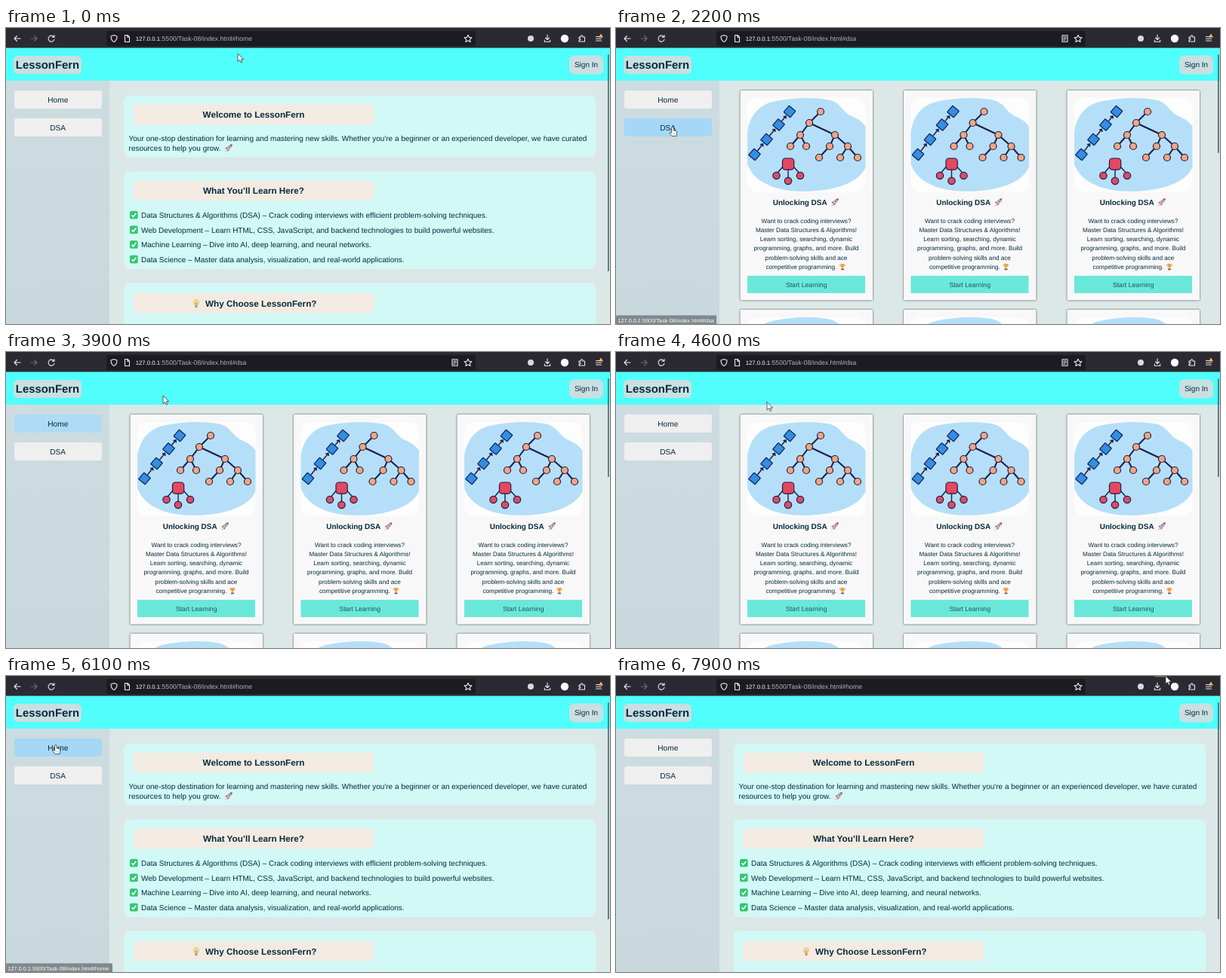
An HTML page that plays this animation: 800x393 px, repeating every 8 s.

```html
<!DOCTYPE html>
<html lang="en">
<head>
<meta charset="utf-8">
<title>Learning site</title>
<style>
  html, body { margin: 0; width: 100%; height: 100%; overflow: hidden; background: #dbe8e7; }
  svg { display: block; width: 100vw; height: 100vh; }
  text {
    font-family: "Liberation Sans", Arial, sans-serif;
    text-rendering: geometricPrecision;
    fill: #062a3d;
    white-space: pre;
  }
  .mid { text-anchor: middle; }
  .bold { font-weight: bold; }
  .icon { fill: none; stroke: #e9e9ee; stroke-width: 1.1; stroke-linecap: round; stroke-linejoin: round; }
  .card { filter: drop-shadow(0 0 1.3px rgba(0, 0, 0, .75)); }
</style>
</head>
<body>
<svg id="stage" viewBox="0 0 800 393" xmlns="http://www.w3.org/2000/svg"></svg>
<script>
const LOOP = 8000, STEP = 100;
const SITE = "LessonFern";
const NAVY = "#1b1d4b";
const PATH = ":5500/Task-08/index.html#";

const rect = (x, y, w, h, fill, r = 0, more = "") =>
  `<rect x="${x}" y="${y}" width="${w}" height="${h}" rx="${r}" fill="${fill}" ${more}/>`;
const text = (s, x, y, size = 10, cls = "", fill = "") =>
  `<text x="${x}" y="${y}" font-size="${size}" class="${cls}"${fill && ` style="fill:${fill}"`}>${s}</text>`;
const dot = (x, y, r, fill, more = "") => `<circle cx="${x}" cy="${y}" r="${r}" fill="${fill}" ${more}/>`;
const path = (d, more = "") => `<path d="${d}" ${more}/>`;
const icon = (d, more = "") => path(d, `class="icon" ${more}`);
const at = (x, y, body) => `<g transform="translate(${x} ${y})">${body}</g>`;

// Small pictograms, about 11 px square
const rocket = (x, y) => at(x, y,
  path("M1 6L4 4L7 7L5 10L4.300 7.800L3.200 6.700Z", 'fill="#e2364f"') +
  path("M3 8L.5 10.500L3 9.800L4 8.500Z", 'fill="#f7a63b"') +
  path("M3 6.500C4.500 3 7 .8 10.500 .5C10.400 4 8 6.600 4.500 8Z", 'fill="#c3bccb" stroke="#8f8699" stroke-width=".5"') +
  path("M7.500 1.100Q9.300 .4 10.500 .5Q10.500 2 9.900 3.500Z", 'fill="#dd2f4c"') +
  dot(6.9, 4.1, 1.1, "#4a91c9"));
const check = y => at(164, y,
  rect(0, 0, 10.6, 10.6, "#32c671", 2) +
  path("M2.500 5.500L4.500 7.700L8.300 2.900", 'fill="none" stroke="#fff" stroke-width="1.600"'));
const bulb = (x, y) => at(x, y,
  path("M3 7C1 5 1.200 1 5 .8C8.800 1 9 5 7 7L6.500 8.500H3.500Z", 'fill="#f8dc9a" stroke="#d4aa63" stroke-width=".7"') +
  path("M3.800 4L5 7.800L6.200 4", 'fill="none" stroke="#d88a3c" stroke-width=".8"') +
  rect(3.5, 8.5, 3, 2.8, "#8e9a93", 1));
const trophy = (x, y) => at(x, y,
  path("M1.500 1.500H.3Q.3 4.300 2.500 4.500M6.500 1.500H7.700Q7.700 4.300 5.500 4.500", 'fill="none" stroke="#e9ab63" stroke-width=".7"') +
  path("M1.500 .5H6.500Q6.500 5 4.600 5.600V7H3.400V5.600Q1.500 5 1.500 .5Z", 'fill="#f0a03e"') +
  rect(2, 7, 4, 1.8, "#8a4a32", .3));

function browserBar() {
  return rect(0, 0, 800, 26.4, "#2b2a33") + rect(133, 4, 489, 20, "#1c1b22", 3) +
    icon("M19 14H11M14.500 10.500L11 14L14.500 17.500") +
    icon("M33 14H41M37.500 10.500L41 14L37.500 17.500", 'opacity=".35"') +
    icon("M63.500 12A4 4 0 1 0 64 15M64 9.500V12.300H61") +
    icon("M143 9.500L147 11C147 15 145.500 17.300 143 18.500C140.500 17.300 139 15 139 11Z") +
    icon("M158 9.500H161L163.500 12V18.500H157.500V9.500ZM160.800 9.700V12.200H163.300") +
    icon("M612 9.200L613.500 12.400L617 12.800L614.400 15.100L615.100 18.500L612 16.800L608.900 18.500L609.600 15.100L607 12.800L610.500 12.400Z") +
    dot(695, 14, 4, "#d9d9de") +
    icon("M717 9V15.500M714.500 13L717 15.500L719.500 13M713.300 16V18.200H720.700V16") +
    dot(740, 14, 5.2, "#fbfbfb") +
    icon("M759 12H761.500C760.500 9 764.800 9 763.800 12H766.500V18H759V16C761.500 16.800 761.500 13.200 759 14Z") +
    icon("M781.500 11.500H788.500M781.500 14.200H788.500M781.500 17H788.500") +
    path("M788 7.500L791 12.500H785Z", 'fill="#ffbd4f"') +
    text("127.0.0.1", 171.700, 17.200, 7.8, "", "#fbfbfe") +
    `<text id="url" x="204.200" y="17.200" font-size="8.600" style="fill:#b3b2bd"></text>` +
    `<g id="reader">${icon("M591 9.800H598V18.200H591ZM592.800 12H596.200M592.800 14H596.200M592.800 16H595")}</g>`;
}

function frame() {
  return rect(0, 26, 800, 44, "#50fffb") +
    rect(10, 37, 90, 24, "#c9dfe1", 6) + text(SITE, 55, 54.200, 14.9, "mid bold") +
    rect(746, 36.500, 45, 25, "#c9dfe1", 7) + text("Sign In", 768.500, 52.400, 10, "mid") +
    rect(0, 70, 137, 323, "url(#side)") +
    rect(11, 83, 116, 24, "#efefef", 3, 'id="home"') + text("Home", 68.800, 99, 10.2, "mid") +
    rect(11, 120, 116, 24, "#efefef", 3, 'id="dsa"') + text("DSA", 68.700, 135.700, 10.2, "mid");
}

function homePage() {
  const panel = (y, h) => rect(156, y, 625.500, h, "#d2f9f6", 8);
  const bar = y => rect(168.500, y, 318.500, 26.500, "#f3ebe1", 4);
  const topics = [
    "Data Structures &amp; Algorithms (DSA) – Crack coding interviews with efficient problem-solving techniques.",
    "Web Development – Learn HTML, CSS, JavaScript, and backend technologies to build powerful websites.",
    "Machine Learning – Dive into AI, deep learning, and neural networks.",
    "Data Science – Master data analysis, visualization, and real-world applications."
  ];
  return panel(89.500, 82) + bar(101.800) + text("Welcome to " + SITE, 328, 119, 11.7, "mid bold") +
    text("Your one-stop destination for learning and mastering new skills. Whether you're a beginner or an experienced developer, we have curated", 162.600, 149.600, 9.98) +
    text("resources to help you grow.", 162.600, 162.800, 9.98) + rocket(289, 154) +
    panel(190.500, 129.500) + bar(202.800) + text("What You’ll Learn Here?", 328, 220, 11.7, "mid bold") +
    topics.map((s, i) => check(243 + 19.6 * i) + text(s, 179, 252 + 19.6 * i, 9.98)).join("") +
    panel(338.500, 80) + bar(352) + bulb(247, 360) + text(`Why Choose ${SITE}?`, 264, 369.700, 11.7, "bold");
}

function picture() {
  const nodes = [[271, 111], [256, 126], [244, 142], [231, 157], [252, 157], [290, 142],
    [283, 157], [307, 157], [269, 172], [297, 172], [320, 172]];
  const parent = [0, 0, 1, 2, 2, 1, 5, 5, 6, 7, 7];
  const boxes = [[183.500, 168], [199.500, 148], [215.500, 128.500], [230, 111]];
  const leaves = [[212.500, 196], [228, 203], [244, 196]];
  const line = `stroke="${NAVY}" stroke-width="2" fill="none"`;
  const edge = `stroke="${NAVY}" stroke-width="1.200"`;
  return rect(174, 93, 156.500, 125, "#fdfdfd", 13) +
    path("M174 138C177 118 188 101 212 97C236 92 262 92 280 95C298 98 299 111 312 117C321 121 327 125 330.500 131V185C322 204 296 213 268 216C240 219 216 215 203 209C189 203 179 194 174 181Z", 'fill="#b5dff8"') +
    boxes.slice(1).map(([x, y], i) => {
      const [a, b] = boxes[i];
      return path(`M${a + 4} ${b - 5}L${x - 5} ${y + 6}m-3.500 .7l3.500 -.7l.3 3.500`, `stroke="${NAVY}" stroke-width="1.500" fill="none"`);
    }).join("") +
    boxes.map(([x, y]) => rect(-5.600, -5.600, 11.2, 11.2, "#318fe6", .6, `${edge} transform="translate(${x} ${y}) rotate(40)"`)).join("") +
    nodes.map((p, i) => path(`M${nodes[parent[i]]}L${p}`, line)).join("") +
    nodes.map(([x, y]) => dot(x, y, 4.5, "#f3a582", edge)).join("") +
    path("M228 188V200M221 184L212.500 194M235 184L244 194", `stroke="${NAVY}" stroke-width="1.400" fill="none"`) +
    rect(220.500, 173, 15.2, 15.2, "#e5475f", 4, edge) +
    leaves.map(([x, y]) => dot(x, y, 4.7, "#dc4c66", edge)).join("");
}

function course(x, y) {
  const lines = ["Want to crack coding interviews?", "Master Data Structures &amp; Algorithms!",
    "Learn sorting, searching, dynamic", "programming, graphs, and more. Build",
    "problem-solving skills and ace"];
  return at(x, y,
    rect(164.500, 83, 175.500, 278.5, "#f8f8f8", 1, 'class="card"') + picture() +
    text("Unlocking DSA", 243.700, 235, 9.95, "mid bold") + rocket(284, 226) +
    lines.map((s, i) => text(s, 252, 258.700 + 12.2 * i, 8.17, "mid")).join("") +
    text("competitive programming.", 198.500, 319.700, 8.17) + trophy(296, 312.500) +
    rect(174, 329, 156, 23, "#69e8da") +
    text("Start Learning", 252.200, 344, 8.7, "mid", "#245058"));
}

function dsaPage() {
  let out = "";
  for (const y of [0, 291]) for (const x of [0, 216.5, 433]) out += course(x, y);
  return out;
}

const arrow = path("M0 0V10.500L2.500 8.300L4.100 12L5.900 11.200L4.300 7.700H7.600Z", 'fill="#fff" stroke="#30343c" stroke-width=".8"');
const hand = path("M-1.300 1.200Q0 -.8 1.200 1.200V5L5 5.800Q6 6.200 5.800 8L5 12.500H-1L-4 8.600Q-4 6.800 -2.500 7.500L-1.300 8.500Z", 'fill="#fff" stroke="#30343c" stroke-width=".8"') +
  path("M2.900 8.500V10.500M.8 8.500V10.500", 'stroke="#555" stroke-width=".5"');

document.getElementById("stage").innerHTML =
  `<defs><linearGradient id="side" x2="0" y2="1"><stop stop-color="#cddce0"/><stop offset="1" stop-color="#c9d8dd"/></linearGradient></defs>` +
  rect(0, 0, 800, 393, "#dbe8e7") +
  `<g id="homePage">${homePage()}</g><g id="dsaPage">${dsaPage()}</g>` +
  frame() + browserBar() + rect(797, 35, 1.7, 288, "#4f6b70", .8, 'id="thumb"') +
  `<g id="status">${rect(0, 381.500, 141, 12, "#7f888c", 1, 'id="tip"')}<text id="link" x="2.500" y="390.500" font-size="7.300" style="fill:#fff"></text></g>` +
  rect(713, 0, 17, 1.3, "#73737b", 0, 'id="tab"') +
  `<g id="arrow">${arrow}</g><g id="hand">${hand}</g>`;

const $ = id => document.getElementById(id);
const show = (id, on) => $(id).style.display = on ? "" : "none";

// Rows: time, values...
const MOVES = [[0, 307, 34], [300, 290, 46], [700, 180, 92], [1000, 84, 129], [1300, 64, 137],
  [1900, 73, 133], [2100, 75, 131], [2500, 75, 131], [2900, 82, 125], [3200, 92, 103], [3700, 116, 94],
  [3900, 208, 58], [4500, 224, 61], [5000, 104, 88], [5400, 68, 91], [6100, 66, 91],
  [6300, 68, 91], [6600, 220, 68], [7000, 520, 22], [7200, 660, 1], [7900, 728, 0]];
const HOVER = {
  home: [[0, 0], [3100, 0], [3400, 1], [3850, 1], [4200, 0], [4900, 0], [5200, 1], [6300, 1], [6600, 0]],
  dsa: [[0, 0], [1000, 0], [1400, 1], [2900, 1], [3200, 0]]
};

function sample(rows, t) {
  const i = rows.findIndex(r => r[0] > t);
  if (i < 0) return rows[rows.length - 1].slice(1);
  const [a, b] = [rows[i - 1], rows[i]], k = (t - a[0]) / (b[0] - a[0]);
  return a.slice(1).map((v, j) => v + (b[j + 1] - v) * k);
}

const between = (t, a, b) => t >= a && t < b;

function draw(t) {
  const onDsa = between(t, 2000, 5800);
  show("homePage", !onDsa);
  show("dsaPage", onDsa);
  show("reader", onDsa);
  $("url").textContent = PATH + (onDsa ? "dsa" : "home");
  $("thumb").setAttribute("height", onDsa ? 131 : 288);

  const toDsa = between(t, 1500, 2300);
  show("status", toDsa || between(t, 5600, 6200));
  $("link").textContent = "127.0.0.1" + PATH + (toDsa ? "dsa" : "home");
  $("tip").setAttribute("width", toDsa ? 133 : 141);

  for (const id in HOVER) {
    const [k] = sample(HOVER[id], t);
    const mix = [[239, 164], [239, 216], [239, 246]].map(([a, b]) => Math.round(a + (b - a) * k));
    $(id).setAttribute("fill", `rgb(${mix})`);
  }

  const [x, y] = sample(MOVES, t);
  const over = between(x, 11, 127) && (between(y, 83, 107) || between(y, 120, 144));
  show("hand", over);
  show("arrow", !over);
  $(over ? "hand" : "arrow").setAttribute("transform", `translate(${x} ${y})`);
  show("tab", t >= 7400);
}

const start = performance.now();
function tick() {
  const t = (performance.now() - start) % LOOP;
  draw(Math.floor(t / STEP) * STEP);
  requestAnimationFrame(tick);
}
tick();
</script>
</body>
</html>
```
